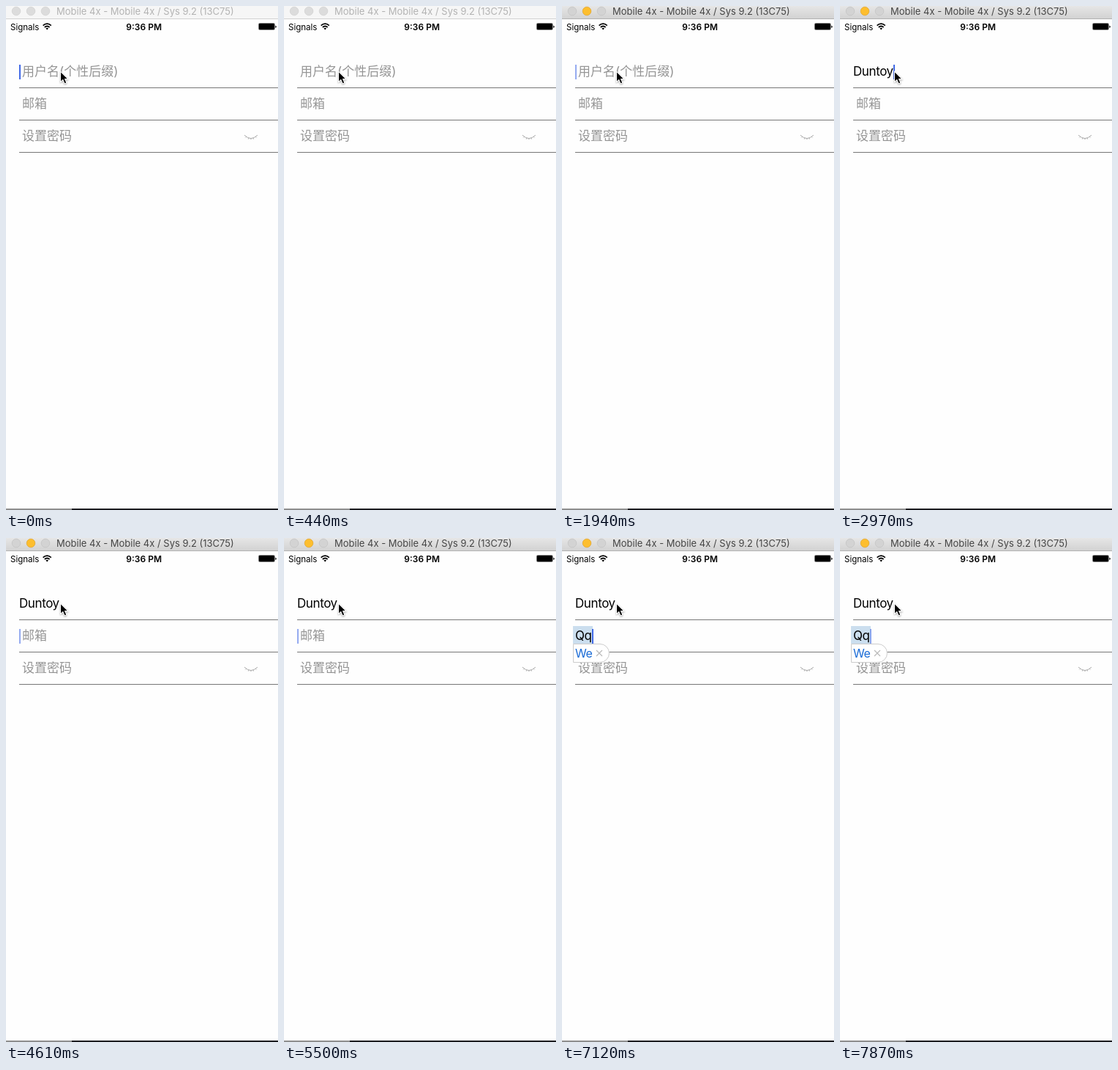
These frames come from a looping animation (372x687 px, 8 s). An HTML page:

```html
<!DOCTYPE html>
<html lang="zh-CN">
<head>
<meta charset="utf-8">
<title>Sign-up form</title>
<style>
  html, body { margin: 0; width: 100%; height: 100%; overflow: hidden; background: #fefefe; }
  svg { display: block; font-family: Inter, "Noto Sans CJK SC", "Noto Sans CJK", sans-serif; }
  .hint { font-size: 17px; fill: #959595; }
  .entry { font-size: 17px; letter-spacing: -.4px; fill: #000; }
  #title { font-size: 13px; fill: #b3b3b3; }
  .active #title { fill: #454545; }
  #bar { fill: #f6f6f6; }
  .active #bar { fill: url(#chrome); }
  #edge { fill: #d2d2d2; }
  .active #edge { fill: #b2b2b2; }
  .light { fill: #dcdcdc; stroke: #d0d0d0; stroke-width: .7; }
  .active .light { fill: #d3d3d3; stroke: #c2c2c2; }
  .active .light.middle { fill: #fdbe2e; stroke: #dfa32a; }
  #pointer { filter: drop-shadow(0 1px 1px rgba(0, 0, 0, .35)); }
</style>
</head>
<body>
<svg id="stage" width="372" height="687" viewBox="0 0 372 687">
  <defs>
    <linearGradient id="chrome" x2="0" y2="1">
      <stop stop-color="#e6e6e6"/><stop offset="1" stop-color="#d2d2d2"/>
    </linearGradient>
  </defs>
  <rect width="372" height="687" fill="#fefefe"/>

  <!-- window bar -->
  <rect id="bar" width="372" height="17"/>
  <rect id="edge" y="17" width="372" height="1"/>
  <circle class="light" cx="14" cy="7" r="5.8"/>
  <circle class="light middle" cx="34" cy="7" r="5.8"/>
  <circle class="light" cx="54" cy="7" r="5.8"/>
  <text id="title" x="69" y="12">Mobile 4x - Mobile 4x / Sys 9.2 (13C75)</text>

  <!-- status bar -->
  <text x="6" y="33" font-size="11.5">Signals</text>
  <g fill="none" stroke="#000" stroke-width="1.7">
    <path d="M50.6 26.7Q56.2 21.7 61.8 26.7M52.8 29Q56.2 26 59.6 29"/>
    <path d="M54.4 30.4Q56.2 29 58 30.4L56.2 32.4Z" fill="#000" stroke="none"/>
  </g>
  <text x="188.7" y="33" font-size="12" font-weight="600" text-anchor="middle">9:36 PM</text>
  <rect x="345.5" y="23.5" width="22" height="9" rx="1.6" fill="none" stroke="#888"/>
  <rect x="346" y="24" width="21" height="8" rx=".8"/>
  <path d="M368.4 26.6q1.4 .4 1.4 1.7t-1.4 1.7z"/>

  <!-- form -->
  <path d="M18 111.5H372M18 155.5H372M18 199.5H372" stroke="#777"/>
  <text class="hint" x="22" y="95">用户名(个性后缀)</text>
  <text class="hint" x="22" y="139">邮箱</text>
  <text class="hint" x="22" y="183">设置密码</text>
  <path d="M326 176Q335 185 344 176M328.6 178.2l-1.2 1.2M332 180l-.6 1.5M335 180.5v1.6M338 180l.6 1.5M341.4 178.2l1.2 1.2"
        fill="none" stroke="#aaa"/>

  <g id="popup">
    <rect x="15" y="120" width="27" height="24" fill="#cbdeee"/>
    <path d="M15.5 144.5H52a12.5 12.5 0 0 1 0 25H15.5Z" fill="#fff" stroke="#ccc"/>
    <text x="18" y="163" font-size="16" letter-spacing="-.4" fill="#1a6bd6">We</text>
    <path d="M47 153l8 8m0-8l-8 8" stroke="#b8b8b8" stroke-width="1.1"/>
  </g>
  <text class="entry" x="18" y="95"></text>
  <text class="entry" x="18" y="139"></text>
  <rect id="caret" width="2" height="20" fill="#4169e6"/>

  <path id="pointer" d="M74.5 89.2V103.6L77.8 100.6L80.1 105.9L82.9 104.7L80.7 99.6H85Z"
        fill="#000" stroke="#fff" stroke-width="1.1"/>

  <!-- lower window edge -->
  <rect y="685" width="90" height="2" fill="#8e8e8e"/>
  <rect x="90" y="685" width="282" height="2" fill="#1c1c20"/>
</svg>
<script>
  const LOOP = 8000, TICK = 148.4;
  const NAME = "Duntoy", MAIL = "Qq";
  const ACTIVATE = 6, NEXT_FIELD = 27, SUGGEST = 48;
  const BLINK = 6.75;

  // Name typing slows towards its last letter.
  const nameKeys = [...NAME].map((_, i) => 14 + 6 * (i / (NAME.length - 1)) ** 3.2);
  const mailKeys = [...MAIL].map((_, i) => 45 + i);
  // Each of these restarts the caret's blinking.
  const actions = [-1.5, ACTIVATE, ...nameKeys, NEXT_FIELD, ...mailKeys];

  const stage = document.getElementById("stage");
  const popup = document.getElementById("popup");
  const caret = document.getElementById("caret");
  const hints = document.querySelectorAll(".hint");
  const entries = document.querySelectorAll(".entry");
  const show = (element, on) => element.setAttribute("visibility", on ? "visible" : "hidden");

  function typed(text, keys, now) {
    return text.slice(0, keys.filter(key => key <= now).length);
  }

  function caretOpacity(now) {
    const age = now - actions.findLast(action => action <= now);
    const phase = age % BLINK;
    if (phase > 4.1) return 0;
    const fadingIn = age >= BLINK && phase < .4;
    return fadingIn || phase > 3.2 ? .55 : 1;
  }

  function draw(time) {
    const now = Math.floor(time / TICK + .05);
    const values = [typed(NAME, nameKeys, now), typed(MAIL, mailKeys, now)];
    const focus = now < NEXT_FIELD ? 0 : 1;

    values.forEach((value, i) => {
      entries[i].textContent = value;
      show(hints[i], !value);
    });
    stage.classList.toggle("active", now >= ACTIVATE);
    show(popup, now >= SUGGEST);

    const width = values[focus] ? entries[focus].getComputedTextLength() : 0;
    caret.setAttribute("x", 18 + Math.round(width));
    caret.setAttribute("y", 80 + 44 * focus);
    caret.setAttribute("opacity", caretOpacity(now));
  }

  const start = performance.now();
  function tick() {
    draw((performance.now() - start) % LOOP);
    requestAnimationFrame(tick);
  }
  tick();
</script>
</body>
</html>
```
